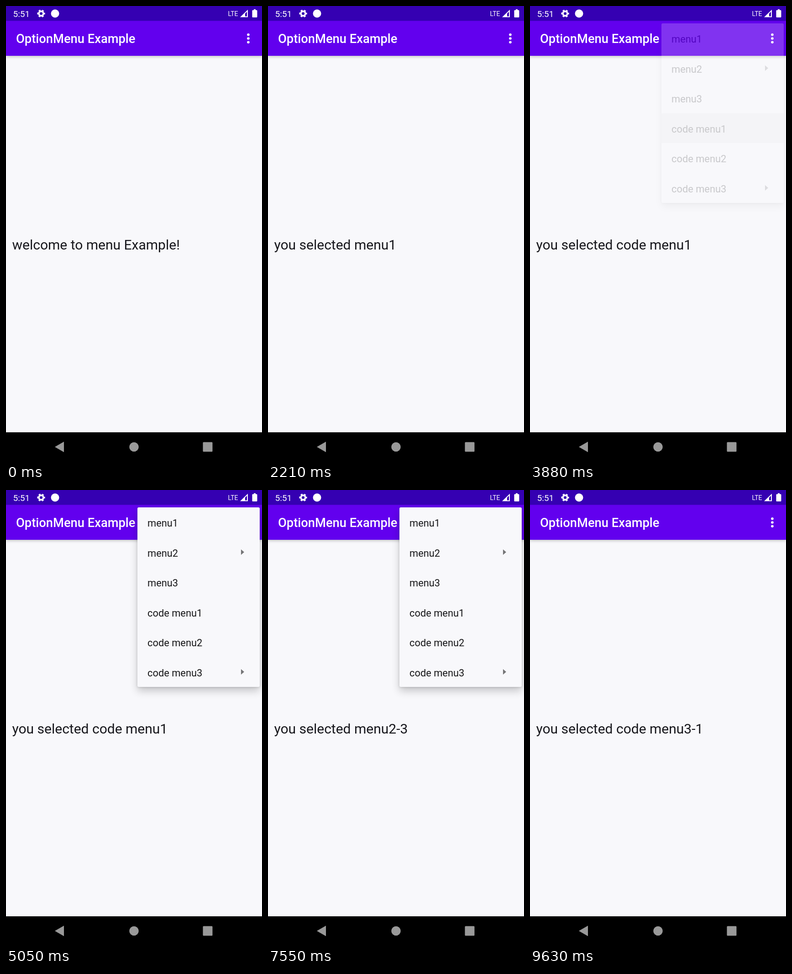
These frames come from a looping animation (561 px wide and 998 px high, 9.67 s). An HTML page:

```html
<!DOCTYPE html>
<html lang="en">
<head>
<meta charset="utf-8">
<title>Option menu</title>
<style>
html, body { margin: 0; width: 100%; height: 100%; overflow: hidden; background: #f8f8fb; }
body { position: relative; font-family: Roboto, sans-serif; }
svg.screen { position: absolute; left: 0; top: 0; width: 561px; height: 998px; }
.bar { filter: drop-shadow(0 2px 3px rgba(0, 0, 0, .22)); }
.popup {
  position: absolute; top: 38px; overflow: hidden; display: none;
  border-radius: 3px; background: #f8f8fb;
  box-shadow: 0 9px 18px rgba(0, 0, 0, .2), 0 1px 5px rgba(0, 0, 0, .14);
}
.list { position: absolute; width: 268px; }
.row {
  position: relative; overflow: hidden; box-sizing: border-box;
  height: 65.5px; padding: 2px 0 0 22px;
  font-size: 21.85px; line-height: 65.5px; white-space: pre; color: #171719;
}
.row.head { font-size: 19.1px; font-weight: 500; color: #737375; }
.row.more::after {
  content: ""; position: absolute; left: 227px; top: 26px;
  border: solid transparent; border-width: 6.5px 0 6.5px 7px; border-left-color: #757577;
}
.ink {
  position: absolute; left: 134px; top: 32.75px; width: 280px; height: 280px;
  margin: -140px; border-radius: 50%; background: rgba(0, 0, 0, .065); display: none;
}
</style>
</head>
<body>
<svg class="screen" viewBox="0 0 561 998">
  <rect width="561" height="998" fill="#f8f8fb"/>
  <rect class="bar" y="32" width="561" height="77" fill="#6200ee"/>
  <rect width="561" height="32.5" fill="#3500b2"/>
  <g fill="#fff">
    <text x="15.5" y="23.5" font-size="19">5:51</text>
    <g transform="translate(77 16.5)">
      <circle r="4.9" fill="none" stroke="#fff" stroke-width="3.6"/>
      <circle r="7.2" fill="none" stroke="#fff" stroke-width="2.8"
              stroke-dasharray="4 3.54" stroke-dashoffset="2"/>
    </g>
    <circle cx="107.5" cy="16.5" r="9"/>
    <text x="486.5" y="22" font-size="14">LTE</text>
    <path d="M513 24.5 530 8V24.5Z"/>
    <path d="M524 16.5 528 12.5V22.5H524Z" fill="#3500b2"/>
    <path d="M543 7h4v2h2q1.5 0 1.5 1.500V23.500q0 1.500-1.500 1.500h-8q-1.500 0-1.500-1.500V10.500q0-1.500 1.500-1.500h2Z"/>
    <text x="22" y="81.300" font-size="27.300" font-weight="500">OptionMenu Example</text>
    <circle id="halo" cx="532" cy="70" r="26" opacity="0"/>
    <circle cx="531" cy="62.800" r="2.800"/>
    <circle cx="531" cy="71" r="2.800"/>
    <circle cx="531" cy="79.200" r="2.800"/>
  </g>
  <text id="message" x="13.500" y="533" font-size="30" fill="#17171c">welcome to menu Example!</text>
  <rect y="933" width="561" height="65" fill="#000"/>
  <g fill="#999">
    <path d="M107 965 127 953.500V976.500Z"/>
    <circle cx="280.500" cy="965" r="10.300"/>
    <rect x="431.500" y="954.500" width="21" height="21" rx="1.500"/>
  </g>
</svg>
<script>
const LOOP = 9670, ROW = 65.5, WIDTH = 268;
const REVEAL = 300, PRESS = 190, FADE = 240;

// x: left edge; rows: "#" marks a header, ">" a submenu
const menus = {
  main: { x: 288, rows: ["menu1", "menu2>", "menu3", "code menu1", "code menu2", "code menu3>"] },
  two: { x: 293, rows: ["#menu2", "2-1", "2-2", "2-3"] },
  three: { x: 293, rows: ["#code menu3", "3-1", "3-2", "3-3"] }
};

// each popup visit: when it opens, which row is pressed and when
const visits = [
  { menu: "main", open: 1160, press: 1740, row: 0, says: "menu1" },
  { menu: "main", open: 2920, press: 3500, row: 3, says: "code menu1" },
  { menu: "main", open: 4540, press: 5060, row: 1 },
  { menu: "two", open: 5300, press: 6050, row: 3, says: "menu2-3" },
  { menu: "main", open: 6800, press: 7590, row: 5 },
  { menu: "three", open: 7800, press: 8590, row: 1, says: "code menu3-1" }
];

const clamp = v => Math.min(1, Math.max(0, v));
const halo = document.getElementById("halo");
const message = document.getElementById("message");

function add(parent, cls, text = "") {
  const el = document.createElement("div");
  el.className = cls;
  el.textContent = text;
  return parent.appendChild(el);
}

for (const menu of Object.values(menus)) {
  menu.box = add(document.body, "popup");
  menu.list = add(menu.box, "list");
  menu.inks = menu.rows.map(label => {
    const cls = label[0] === "#" ? "row head" : label.endsWith(">") ? "row more" : "row";
    return add(add(menu.list, cls, label.replace(/[#>]/g, "")), "ink");
  });
}

// cubic-bezier(.4, 0, .2, 1)
function ease(x) {
  let lo = 0, hi = 1;
  for (let i = 0; i < 20; i++) {
    const s = (lo + hi) / 2, r = 1 - s;
    if (1.2 * r * r * s + .6 * r * s * s + s * s * s < x) lo = s; else hi = s;
  }
  return lo * lo * (3 - 2 * lo);
}

// slide out of the overflow button while the clip grows
function place(menu, q) {
  const height = menu.rows.length * ROW;
  Object.assign(menu.box.style, {
    left: menu.x + 207 * q + "px",
    width: WIDTH - 200 * q + "px",
    height: height * (1 - q) + "px"
  });
  menu.list.style.left = -100 * q + "px";
  menu.list.style.top = -height / 2 * q + "px";
}

function drawMenu(name, menu, t) {
  const v = visits.find(v => v.menu === name && t >= v.open && t < v.press + PRESS + FADE);
  menu.box.style.display = v ? "block" : "none";
  if (!v) return;
  place(menu, 1 - ease(clamp((t - v.open) / REVEAL)));
  menu.box.style.opacity = clamp((t - v.open) / 100) * (1 - clamp((t - v.press - PRESS) / FADE));
  menu.inks.forEach((ink, i) => {
    ink.style.display = i === v.row && t >= v.press ? "block" : "none";
    ink.style.transform = `scale(${.6 + .4 * clamp((t - v.press) / 100)})`;
  });
}

function drawHalo(t) {
  const v = visits.find(v => v.menu === "main" && t >= v.open - 200 && t < v.open + 200);
  halo.setAttribute("opacity", v ? .2 * (1 - clamp((t - v.open - 50) / 150)) : 0);
  if (v) halo.setAttribute("r", 10 + 16 * clamp((t - v.open + 200) / 100));
}

function draw(t) {
  for (const name in menus) drawMenu(name, menus[name], t);
  drawHalo(t);
  const last = visits.filter(v => v.says && t >= v.press + PRESS).pop();
  const text = last ? "you selected " + last.says : "welcome to menu Example!";
  if (message.textContent !== text) message.textContent = text;
}

function tick() {
  draw(performance.now() % LOOP);
  requestAnimationFrame(tick);
}
tick();
</script>
</body>
</html>
```
